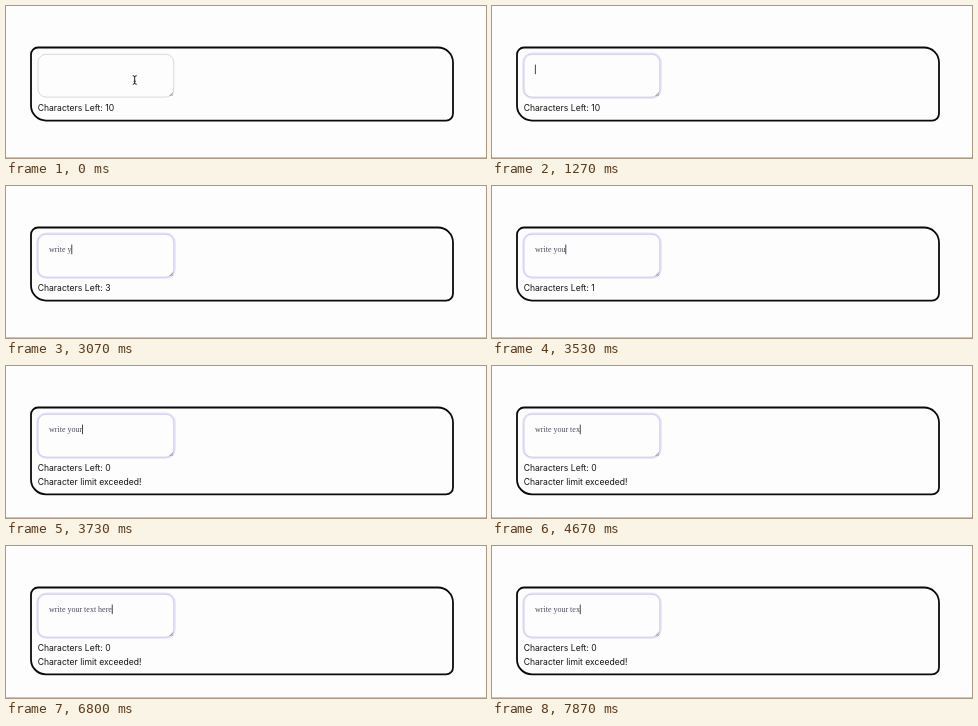
Recreate the animation shown at these times as an HTML page. Size 480 by 152 pixels, loop 8000 ms.

```html
<!DOCTYPE html>
<html lang="en">
<head>
<meta charset="utf-8">
<title>Character counter</title>
<style>
  html, body { margin: 0; width: 100%; height: 100%; overflow: hidden; background: #fdfdfd; }
  svg { display: block; }
  text { white-space: pre; }
  .label { font: 8.6px Inter, "Liberation Sans", sans-serif; fill: #111; }
  .typed { font: 8px "Liberation Serif", "Times New Roman", serif; fill: #4b4f5c; }
</style>
</head>
<body>
<svg width="480" height="152" viewBox="0 0 480 152">
  <rect width="480" height="152" fill="#fdfdfd"/>
  <rect y="151" width="480" height="1" fill="#c6c6c8"/>
  <path id="card" fill="#fdfdfd" stroke="#0a0a0a" stroke-width="1.8"/>
  <rect id="glow" x="31.5" y="47.8" width="137" height="43.8" rx="8.5" fill="none" stroke="#e4e2f8" stroke-width="2.4"/>
  <rect id="field" x="32" y="48.3" width="135.8" height="42.8" rx="8" fill="#fdfdfd" stroke-width="1"/>
  <path d="M163.6 90L167 86.6M165.6 90L167 88.6" stroke="#666" stroke-width=".7"/>
  <text id="typed" class="typed" x="43" y="66"></text>
  <rect id="caret" y="58.6" width=".9" height="9.6" fill="#333"/>
  <text id="count" class="label" x="31.7" y="104.8"></text>
  <text id="warning" class="label" x="31.7" y="118.6">Character limit exceeded!</text>
  <g id="pointer">
    <path id="beam" d="M-2 -4.3Q0 -4.3 0 -3Q0 -4.3 2 -4.3M0 -3V3M-2 4.3Q0 4.3 0 3Q0 4.3 2 4.3M-1 1.3H1" fill="none" stroke="#222" stroke-width="1"/>
    <path id="arrow" d="M0 0V9L2.1 7.1L3.5 10.2L4.9 9.6L3.5 6.6H6.3Z" fill="#111" stroke="#fff" stroke-width=".7"/>
  </g>
</svg>
<script>
const LOOP = 8000, LIMIT = 10, FOCUS = 200;
const MESSAGE = "write your text here";
const keyTimes = [1400, 1800, 2070, 2330, 2470, 2600, 3070, 3270, 3530, 3730,
                  3800, 4200, 4330, 4670, 4870, 5070, 5330, 5530, 5670, 5800];
const deleteTimes = [7070, 7270, 7470, 7600, 7730, 7870];
const caretGaps = [[0, FOCUS], [730, 1270], [6330, 6800]];
const move = { start: 70, end: 620, from: [128.7, 74], to: [152, 160] };

const el = id => document.getElementById(id);
const show = (id, on) => el(id).setAttribute("visibility", on ? "visible" : "hidden");
const passed = (times, t) => times.filter(time => time <= t).length;

function cardPath(bottom) {
  const l = 25, r = 447, top = 41.5, small = 7, big = 15;
  return `M${l + small} ${top}H${r - big}A${big} ${big} 0 0 1 ${r} ${top + big}` +
    `V${bottom - small}A${small} ${small} 0 0 1 ${r - small} ${bottom}` +
    `H${l + big}A${big} ${big} 0 0 1 ${l} ${bottom - big}` +
    `V${top + small}A${small} ${small} 0 0 1 ${l + small} ${top}Z`;
}

function drawPointer(t) {
  const p = Math.min(1, Math.max(0, (t - move.start) / (move.end - move.start)));
  const [x, y] = move.from.map((a, i) => a + (move.to[i] - a) * p * p);
  const inField = y < 91;
  el("pointer").setAttribute("transform", `translate(${x} ${y})`);
  show("beam", p < 1 && inField);
  show("arrow", p < 1 && !inField);
}

function render(t) {
  const length = passed(keyTimes, t) - passed(deleteTimes, t);
  const focused = t >= FOCUS;
  const full = length >= LIMIT;

  el("typed").textContent = MESSAGE.slice(0, length);
  el("count").textContent = `Characters Left: ${Math.max(0, LIMIT - length)}`;
  el("caret").setAttribute("x", 42.9 + (length ? el("typed").getComputedTextLength() : 0));
  show("caret", !caretGaps.some(([from, to]) => t >= from && t < to));
  show("warning", full);
  show("glow", focused);
  el("field").setAttribute("stroke", focused ? "#cfcdf0" : "#d9d9dc");
  el("card").setAttribute("d", cardPath(full ? 128.4 : 114.6));
  drawPointer(t);
}

const began = performance.now();
function tick() {
  render((performance.now() - began) % LOOP);
  requestAnimationFrame(tick);
}
tick();
</script>
</body>
</html>
```
